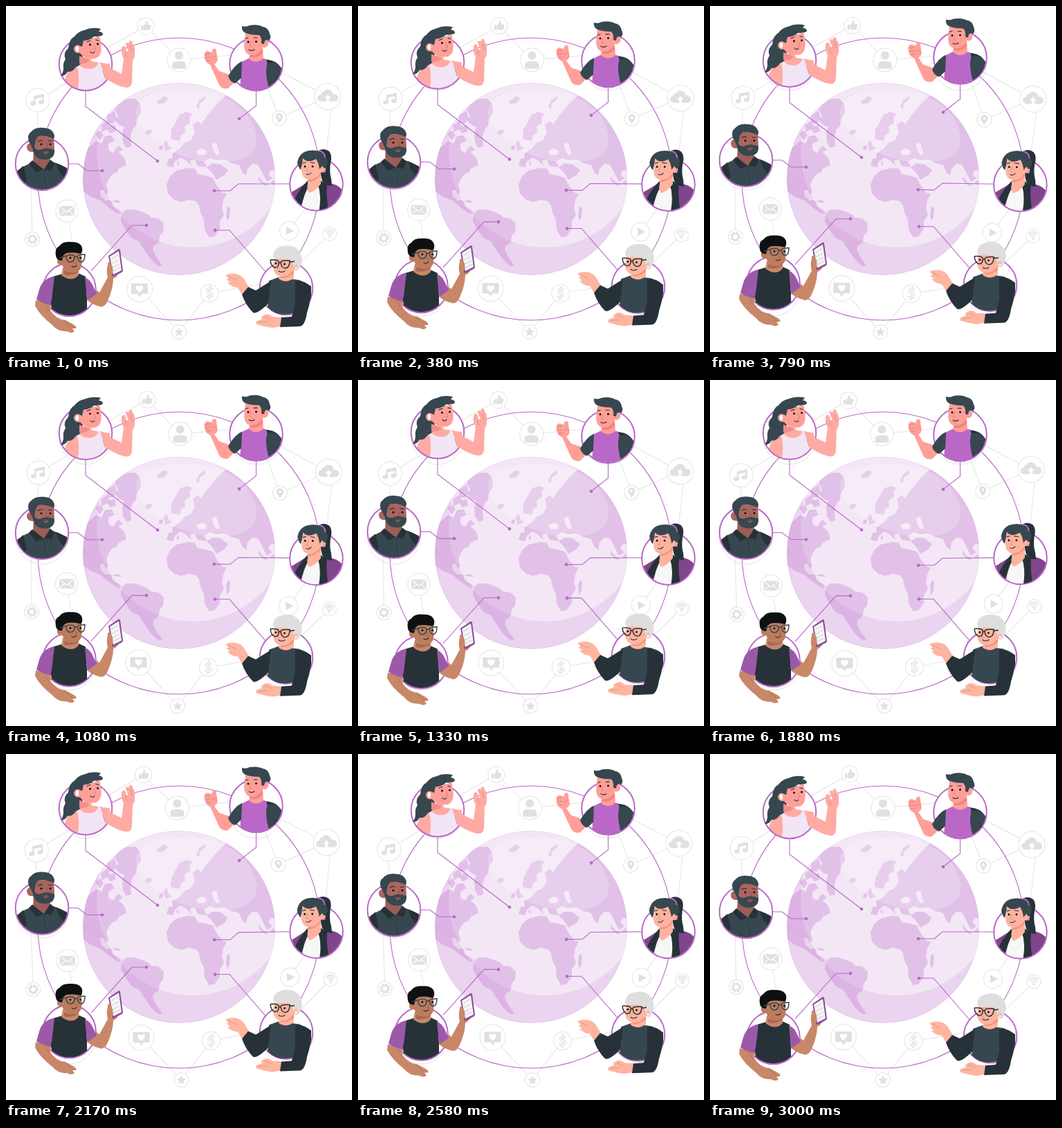
Animation of 500x500 px, one loop 3.04 s. Source, as an HTML page:

```html
<!DOCTYPE html>
<html lang="en">
<head>
<meta charset="utf-8">
<title>Global network</title>
<style>
html, body { margin: 0; width: 100%; height: 100%; overflow: hidden; background: #fff; }
svg { display: block; width: 100%; height: 100%; }
.net { fill: none; stroke: #e4e4e4; }
.icon { fill: #e0e0e0; }
.icon > circle:first-child { fill: #fff; stroke: #e4e4e4; }
.w { fill: #fff; }
.ol { fill: none; stroke: #e0e0e0; }
.wl { fill: none; stroke: #fff; stroke-width: 1.2; }
.link { fill: none; stroke: #ba68c8; stroke-width: 1.1; }
.ring { fill: none; stroke: #ba68c8; stroke-width: 2; }
.d { fill: #37474f; }
.k { fill: #263238; }
.v { fill: #ba68c8; }
.face { fill: none; stroke: #263238; stroke-width: 1.1; stroke-linecap: round; }
.glass { fill: none; stroke: #37474f; stroke-width: 1.5; }
.fold { fill: none; stroke: #0003; stroke-width: .8; stroke-linecap: round; }
</style>
</head>
<body>
<svg viewBox="0 0 500 500" id="stage"></svg>
<script>
const LOOP = 3040, CYCLE = 3000, RING = 38;

const icon = (x, y, r, art) =>
  `<g class="icon" transform="translate(${x} ${y})"><circle r="${r}"/>${art}</g>`;

const network = `<g id="net">
<path class="net" d="M202 29L250 78M202 29L140 64M250 78L335 70M46 136L105 100M45 140L46 190M465 131L385 89
M465 131L395 162L376 112M471 140L462 220M409 325L438 284M468 329L415 381M88 296L97 350M38 337L36 250
M193 409L250 471L294 415L375 401"/>` +
icon(202, 29, 12, '<path d="M-7-1h3.500v7h-3.500zM-3 5v-6l3-3v-3q3-1 3 2v3h4q1 1 0 4l-1 3q0 1-2 1h-5z"/>') +
icon(250, 78, 17, '<circle cy="-6.500" r="6"/><path d="M-10 10q-1-8 6-8h8q7 0 6 8q0 2.500-3 2.500h-14q-3 0-3-2.500z"/>') +
icon(46, 136, 17, '<path d="M-6 5V-6L9-9V3h-2.500v-7l-10 2v7z"/><ellipse cx="-7" cy="5" rx="4" ry="3"/><ellipse cx="5" cy="3" rx="4" ry="3"/>') +
icon(465, 131, 19, '<path d="M-10 7q-5-1-5-5t5-5q0-4 4-4q3-5 8-3q5 1 5 6q8 0 8 6q0 5-5 5z"/><path class="w" d="M0-3l5 5h-3v6h-4v-6h-3z"/>') +
icon(395, 162, 10.5, '<path d="M0 7Q-5 1-5-2A5 5 0 0 1 5-2Q5 1 0 7z"/><circle class="w" cy="-2" r="2"/>') +
icon(409, 325, 13.5, '<path d="M-4-6L7 0L-4 6z"/>') +
icon(468, 329, 10, '<circle cy="4" r="1.500"/><path class="ol" stroke-width="1.500" d="M-3 2q3-3 6 0M-5-.5q5-5 10 0M-7-3q7-6 14 0"/>') +
icon(88, 296, 16, '<rect x="-11" y="-7" width="22" height="14" rx="1"/><path class="wl" d="M-10-6L0 2L10-6M-10 6L-3 0M10 6L3 0"/>') +
icon(38, 337, 10.5, '<circle class="ol" r="4.700" stroke-width="2.500"/><circle class="ol" r="6.500" stroke-width="2" stroke-dasharray="2.550"/>') +
icon(193, 409, 18.5, '<path d="M-12-8h24v15h-9l-3 5l-3-5h-9z"/><path class="w" d="M0 5L-5 0Q-6-5-2-5Q0-4 0-3Q0-4 2-5Q6-5 5 0z"/>') +
icon(294, 415, 13, '<text class="ol" y="7" text-anchor="middle" font-family="Lato, sans-serif" font-weight="700" font-size="20">$</text>') +
icon(250, 471, 10.5, '<path d="M0-7l2 5l5 .300l-4 3.300l1.300 5l-4.300-3l-4.300 3l1.300-5l-4-3.300l5-.300z"/>') + '</g>';

const land = `M164 139L176 134L187 134L194 141L195 155L189 163L188 173L183 178L180 188L181 203L174 205L169 197L168 183L171 175L164 172L158 166L162 158L157 149z
M146 158L157 151L160 163L154 170L146 169zM137 172L146 166L150 174L157 172L159 181L151 184L146 178L139 182zM129 184L137 180L141 187L135 194z
M108 251L108 222L120 204L131 195L138 199L143 188L152 187L157 194L148 199L148 208L154 212L160 207L164 213L171 219L174 230L163 235L161 240L153 244L148 251L145 258L148 270L144 272L141 266L136 266L137 275L144 281L152 281L154 289L164 295L168 300L161 300L147 290L136 281L123 276L112 268z
M153 282L160 280L168 284L160 284z
M167 300L174 294L185 294L195 297L205 301L210 306L220 307L228 314L227 326L222 332L221 341L213 347L212 353L218 364L226 375L220 376L210 367L199 351L192 340L181 335L172 322L166 311z
M237 246L246 238L262 234L273 235L277 243L288 245L299 248L305 260L313 270L319 271L314 281L312 292L315 302L309 311L309 322L301 333L293 334L287 323L286 309L281 299L279 288L274 282L264 280L253 283L243 280L234 271L232 258z
M320 289L324 292L323 305L319 311L318 299z
M290 233L298 228L309 228L321 237L315 245L304 251L297 240z
M238 192L239 178L245 168L251 157L261 153L270 156L265 161L266 169L258 174L259 183L253 187L251 195L245 194z
M232 231L235 221L241 220L240 213L250 207L258 198L267 194L273 183L270 172L277 166L282 171L291 158L302 145L312 134L326 124L400 160L400 238L383 237L379 243L385 249L377 254L370 240L364 229L356 228L349 235L347 245L342 242L337 230L326 227L316 222L304 223L295 220L286 225L290 233L277 231L273 222L266 223L268 231L259 222L251 219L244 225L241 233z
M227 199L232 193L235 202L240 206L231 209zM222 202L227 201L226 208L221 208z
M202 180L208 178L212 182L206 187L201 185zM217 138L224 134L229 130L234 134L229 140L222 142z
M275 146L279 136L289 130L288 135L280 141L279 149zM366 247L371 254L379 259L374 260L365 252zM382 255L388 251L387 259z
M157 207L163 202L169 208L164 211zM246 228L249 224L250 231z`;

const globe = `<g clip-path="url(#globe)">
<circle cx="250" cy="250" r="139" fill="#ead4ef"/>
<circle cx="270" cy="210" r="139" fill="#f3e7f6"/>
<path d="${land}" fill="#ba68c8" opacity=".3"/>
<path d="M275 210l7-4l8 3l-2 6l-10 1zM298 199l6-1l2 7l3 9l-5 2l-5-9z" fill="#f3e7f6"/>
<path d="M188 151C190 132 216 121 264 121C316 121 361 151 362 194C362 216 337 228 301 226C245 223 186 188 188 151z" fill="#fff" opacity=".2"/>
</g><circle cx="250" cy="250" r="138.500" fill="none" stroke="#ba68c8" stroke-opacity=".12"/>`;

// body is cut by the ring, top may reach outside it
const people = [];
const person = (x, y, move, dot, link, body, top) => people.push({ x, y, move, dot, link, body, top });

// Woman with wavy hair
person(115, 84, 'slow', [219, 224], 'M115 122V145L219 224',
`<path fill="#ffaaa3" d="M105 76L104 84Q88 90 84 110L80 125H150V84L124 80L122 72z"/>
<path fill="#f2e5f6" d="M102 84L105 83Q110 92 123 91Q132 89 134 80L138 82Q140 92 146 101V124H103Q108 103 102 84z"/>`,
`<path class="d" d="M140 42Q132 46 124 43L113 64L109 80Q108 86 101 88Q96 96 89 95Q85 102 79 101Q83 96 83 90Q82 82 86 77Q82 68 90 61Q91 48 99 44Q104 37 113 35Q124 30 137 33L134 37Q140 37 140 42z"/>
<path fill="#ffaaa3" d="M136 81Q145 84 153 91L167 98L170 76Q166 70 167 61Q169 55 173 60L174 66L177 65L173 56Q173 51 177 54L179 50Q183 50 183 55Q187 57 186 68Q187 74 183 79L182 110Q181 118 174 118Q160 116 143 104Z"/>
<path class="fold" d="M174 66Q171 71 176 74M180 57L182 66M143 104L140 94"/>
<path fill="#f28e8a" d="M106 72L121 78Q117 85 106 83z"/>
<path fill="#ff9f98" d="M109 49Q124 49 135 43Q140 62 136 70Q132 77 125 76Q112 76 107 68Q98 69 98 61Q101 54 108 58z"/>
<path class="d" d="M106 57L109 43L132 40Q122 50 112 50L110 59z"/>
<ellipse class="w" cx="103" cy="62" rx="2.200" ry="4"/>
<circle cx="121.500" cy="56" r="1.400"/><circle cx="132.500" cy="55" r="1.400"/>
<path class="face" d="M117 52L122 50M130 49L134 50M122 66Q125 70 128 66"/><path class="fold" d="M127 56L130 62L126 63"/>`);

// Man with thumb up
person(361.5, 84, 'fast', [337, 163], 'M361.500 122V144L337 163',
`<path class="k" d="M374 77Q396 79 398 94L394 112L381 118L374 100z"/>
<path class="v" d="M340 81L352 75L374 76Q380 80 376 92Q377 108 382 124H338z"/>
<path class="d" d="M377 84Q388 76 400 92L380 119Q374 98 377 84z"/>`,
`<path fill="#ff9f98" d="M301 84L308 94L320 98L332 108L321 119Q312 121 308 114L295 85Q288 82 287 75Q285 66 291 65L297 67L299 62Q304 60 304 66L305 73Q308 80 301 84z"/>
<path class="fold" d="M288 70L295 69M288 75L295 74M290 79L296 79M304 72L298 75"/>
<path class="d" d="M341 80Q331 84 321 101Q323 109 331 112L340 104z"/>
<path fill="#ff9f98" d="M352 64L371 59L372 76Q361 85 351 76z"/><path fill="#f28580" d="M353 69Q364 70 371 62L371 68Q364 76 353 74z"/>
<path fill="#ff9f98" d="M346 39L371 41L372 49Q381 49 379 56Q376 62 370 59Q366 71 354 71Q345 70 344 58z"/>
<path class="d" d="M341 29Q347 31 352 28Q364 26 371 30Q379 31 381 40Q384 46 380 50Q374 46 373 55L369 54Q370 46 366 42Q354 42 346 39Q340 36 341 29z"/>
<circle cx="350" cy="52" r="1.400"/><circle cx="361.500" cy="51.500" r="1.400"/>
<path class="face" d="M346 47L350 46M358 46L363 46M351 63Q354 66 359 63"/><path class="fold" d="M354 52L352 58L355 59"/>`);

// Bearded man
person(52, 228, 'slow', [139, 238], 'M90 228H104L117 238H139',
`<path class="d" d="M12 243Q18 234 36 227L66 225Q82 229 92 238V270H12z"/>
<path class="k" d="M12 243L25 231L30 252L22 262L12 258zM72 227L88 234V253L77 240z"/>
<path class="fold" d="M55 236L58 267"/>`,
`<path fill="#9b5d57" d="M40 208L63 216L64 225L55 236L39 227z"/>
<path class="k" d="M38 223L54 236L44 241L33 228zM64 222L70 227L66 238L55 236z"/>
<path fill="#a9655f" d="M39 187L69 189L70 207Q69 219 56 221Q43 220 40 211Q30 212 30 203Q32 196 39 200z"/>
<path class="d" d="M37 203L33 196Q30 186 36 182Q42 175 53 176Q67 176 70 187Q70 190 69 192Q60 187 47 188Q43 191 42 198L41 204Q45 211 54 206Q63 205 70 208Q71 221 57 222Q41 222 39 208z"/>
<path fill="#a9655f" d="M53 211Q58 208 62 211L57 214z"/>
<circle cx="51" cy="200" r="1.400"/><circle cx="64" cy="200" r="1.400"/>
<path class="face" d="M46 196Q49 193 53 195M61 195L66 195M55 211L59 211"/><path class="fold" d="M58 199L61 205L57 206"/>`);

// Woman with ponytail
person(448.5, 257.5, 'sway', [301, 267], 'M410 257H336L324 267H301',
`<path fill="#80458b" d="M408 272L432 257L455 255L472 257Q484 260 490 272L474 300H408z"/>
<path fill="#f7f7f7" d="M436 257L452 254L456 300H424z"/>
<path class="k" d="M438 250L439 258Q428 276 425 296L414 286Q422 266 438 250zM451 250L464 258Q462 276 467 299H452Q457 270 450 258z"/>`,
`<path class="k" d="M450 210Q459 204 467 210Q472 216 469 227Q467 240 470 250L471 260Q463 260 457 253Q452 236 458 223z"/>
<path fill="#ffb39f" d="M436 244L455 237V257Q447 268 438 270Q434 264 436 257z"/>
<path fill="#ef9480" d="M437 250Q447 249 454 240V245Q447 254 437 254z"/>
<path fill="#ffb39f" d="M429 220L456 217L456 231Q463 231 462 237Q459 242 455 240Q449 251 438 251Q428 250 427 239z"/>
<path class="d" d="M421 226Q424 211 438 209Q455 206 463 219Q468 229 460 235L457 231L453 236Q452 227 448 221Q436 228 429 220Q428 230 426 237Q422 233 421 226z"/>
<path fill="none" stroke="#ba68c8" stroke-width="2" d="M452 209Q461 211 461 219"/>
<circle cx="460" cy="239" r="1.800" fill="#e58cc4"/>
<circle cx="432" cy="232" r="1.400"/><circle cx="443" cy="232" r="1.400"/>
<path class="face" d="M429 227L433 226M440 226L446 227M434 243Q438 245 441 241"/><path class="fold" d="M437 232L434 238L437 239"/>`);

// Man with phone
person(91.5, 410, 'fast', [203, 317], 'M123 383L182 317H203',
`<path class="k" d="M68 391L82 387L106 387L115 391L118 452H66z"/>`,
`<path fill="#c98769" d="M43 425L65 431L64 440Q73 453 86 454L97 460Q103 463 101 466L96 466L99 470Q95 474 88 470Q75 471 67 461Q48 446 42 433z"/>
<path fill="#c98769" d="M117 420L131 411L135 414L147 392Q144 381 148 372L152 377L155 371L163 386Q161 391 155 394Q155 408 147 426Q142 437 135 434Q126 432 117 425z"/>
<path fill="#8e4b9b" d="M148 361L163 351Q165 351 165 353L169 382Q169 384 167 385L155 391Q153 391 153 389z"/>
<path fill="#f5f5f5" d="M150 362L163 354L167 382L155 388z"/>
<path stroke="#ccc" d="M152 366L162 360M153 372L163 367M154 378L164 373M155 383L165 378"/>
<path fill="#c98769" d="M147 371Q151 369 153 375Q156 381 153 389L147 389z"/>
<path fill="#9c59a9" d="M71 390Q52 394 48 410L44 424Q54 431 66 432Q72 410 71 390zM112 391Q122 395 126 405L131 416L118 425z"/>
<path class="k" d="M70 391L82 387L106 387L114 391L117 425L117 438H66Q64 426 66 425z"/>
<path fill="#c98769" d="M82 378L105 379L105 389Q95 400 80 389z"/><path fill="#a76a50" d="M84 382Q95 388 105 381V384Q95 391 84 388z"/>
<path fill="#bd7c5e" d="M82 350L108 350Q111 372 108 379Q104 386 95 385Q85 384 81 374Q73 375 74 367Q77 362 81 365z"/>
<path d="M72 361Q70 350 77 347Q82 340 93 341Q107 340 110 349Q111 356 108 358Q97 355 87 357L83 360L81 368Q73 368 72 361z" fill="#0e1112"/>
<path class="glass" d="M78 364L87 361Q97 358 99 362Q99 370 93 370Q87 370 87 361M99 363L103 362Q104 359 114 359Q114 369 109 370Q104 369 103 362"/>
<circle cx="93" cy="364" r="1.400"/><circle cx="107.500" cy="364" r="1.400"/>
<path class="face" d="M95 376Q98 379 102 375"/><path class="fold" d="M100 366L103 371L99 372"/>
<path class="fold" d="M84 455L97 465M62 441Q58 437 57 432"/>`);

// Woman with white hair
person(405, 408, 'slow', [302, 324], 'M375 384L323 324H302',
`<path class="d" d="M380 397L394 392L424 396L441 405V450H377L381 425z"/>`,
`<path fill="#ffb59f" d="M317 389Q324 386 331 387Q341 388 346 398L352 408L341 417L335 407Q327 407 320 400L324 399L318 395L322 394z"/>
<path fill="#ffb59f" d="M361 456L371 452Q365 451 374 446Q380 444 385 449L399 450L397 463L385 465Q375 464 362 460z"/>
<path class="fold" d="M322 391L332 396M365 457L378 456M374 449L383 453"/>
<path class="k" d="M385 396L361 411L350 406L341 417Q346 432 357 443Q363 446 381 428z"/>
<path class="d" d="M383 397L396 392L420 398L424 427L416 443Q393 451 378 435L380 420z"/>
<path class="k" d="M418 397Q432 396 441 406Q442 422 435 443Q432 463 424 463L396 464L398 450L413 449L418 430Z"/>
<path class="face" stroke="#111" d="M418 430L423 433M413 449L420 446"/>
<path fill="#ffb59f" d="M396 385L416 382L416 393Q405 402 394 394z"/><path fill="#ef967f" d="M397 389Q408 390 416 381V386Q408 394 397 393z"/>
<path fill="#ffb59f" d="M389 359L416 360L416 373Q425 371 424 378Q421 384 415 381Q409 392 398 391Q386 389 386 375z"/>
<path fill="#dedede" d="M386 361Q387 349 400 347Q417 344 424 355Q431 365 425 377Q423 383 419 383Q424 376 419 373L416 377L412 367Q400 364 388 366z"/>
<circle cx="419" cy="379" r="1.600" fill="#fff"/>
<path class="glass" style="stroke:#263238" d="M382 367Q391 366 394 369Q395 378 389 378Q383 377 382 367M394 371L397 371Q397 367 410 368Q410 378 404 379Q398 379 397 371M410 370L417 369"/>
<circle cx="390" cy="372" r="1.400"/><circle cx="402.500" cy="373" r="1.400"/>
<path class="face" d="M394 383Q398 386 403 383"/><path class="fold" d="M395 373L392 379L396 380"/>`);

const draw = (p, i) => `<g data-move="${p.move}">
<path class="link" d="${p.link}"/><circle class="v" cx="${p.dot[0]}" cy="${p.dot[1]}" r="2.300"/>
<circle class="w" cx="${p.x}" cy="${p.y}" r="${RING}"/><g clip-path="url(#cut${i})">${p.body}</g>
<circle class="ring" cx="${p.x}" cy="${p.y}" r="${RING + .3}"/>${p.top}</g>`;

const stage = document.getElementById('stage');
stage.innerHTML = `<defs><clipPath id="globe"><circle cx="250" cy="250" r="139"/></clipPath>` +
  people.map((p, i) => `<clipPath id="cut${i}"><circle cx="${p.x}" cy="${p.y}" r="${RING}"/></clipPath>`).join('') +
  '</defs>' + network + '<circle class="link" cx="250" cy="250" r="204"/>' + globe +
  people.map(p => `<circle class="net" cx="${p.x}" cy="${p.y}" r="${RING}"/>`).join('') +
  people.map(draw).join('');

const net = document.getElementById('net');
const movers = stage.querySelectorAll('[data-move]');

// Linear rise and fall, 0 to 1 to 0 over one cycle
const bounce = u => 1 - Math.abs(1 - 2 * (u % 1));

function frame(now) {
  const u = now % LOOP / CYCLE;
  const tilt = 2 * bounce(u + .25) - 1;
  const pose = {
    slow: `translate(0 ${-10 * bounce(u)})`,
    fast: `translate(0 ${-10 * bounce(u * 2)})`,
    sway: `rotate(${tilt} 394 251)`
  };
  net.setAttribute('transform', `rotate(${tilt} 251 250)`);
  movers.forEach(m => m.setAttribute('transform', pose[m.dataset.move]));
  requestAnimationFrame(frame);
}
requestAnimationFrame(frame);
</script>
</body>
</html>
```
